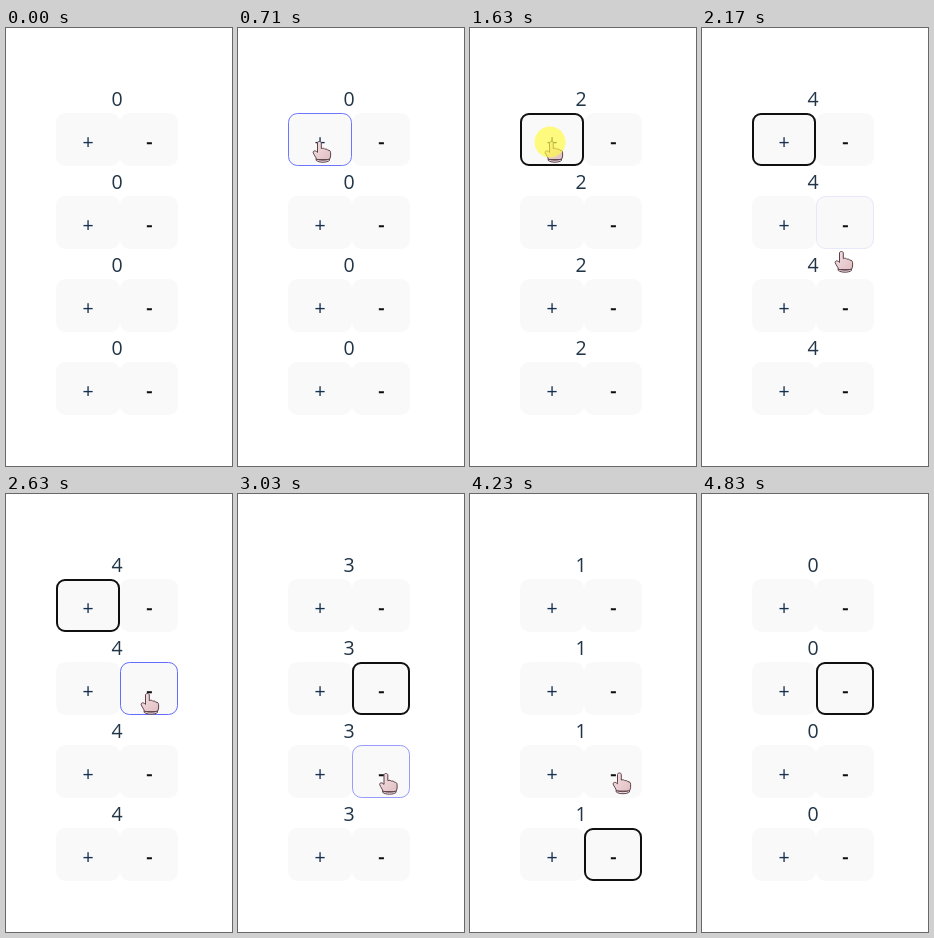
Recreate the animation shown at these times as an HTML page. Size 226 by 438 pixels, loop 5430 ms.

```html
<!DOCTYPE html>
<html lang="en">
<head>
<meta charset="utf-8">
<title>Counters</title>
<style>
  html, body { margin: 0; width: 100%; height: 100%; overflow: hidden; background: #fff; }
  svg { display: block; width: 226px; height: 438px; }
  text { font: 19.5px "Open Sans", "Noto Sans", sans-serif; text-anchor: middle; }
  .count { fill: #213547; }
  .plus { fill: #16304f; }
  .minus { fill: #0c0c0c; stroke: #0c0c0c; stroke-width: .4px; }
  #spot { fill: #fffa3a; opacity: .65; }
</style>
</head>
<body>
<svg viewBox="0 0 226 438">
  <defs>
    <linearGradient id="skin" x1="0" y1="0" x2="1" y2="1">
      <stop offset="0" stop-color="#f5e2e3"/>
      <stop offset="1" stop-color="#e0bec2"/>
    </linearGradient>
  </defs>
  <g id="rows"></g>
  <rect id="hover" fill="none" stroke="#646cff"/>
  <rect id="ring" fill="none" stroke="#101010" stroke-width="2"/>
  <g id="hand" stroke="#5c4149" stroke-linejoin="round">
    <path fill="url(#skin)" d="M-.5 9V1C-.5-1 3.3-1 3.3 1V6.6C5 6 6.3 6.2 6.8 7.2C8.2 6.8 9.4 7.2 9.8 8.2C11.6 8 12.6 9 12.6 10.8V14C12.6 15.6 11.8 16.4 11.4 17.6H-1.6C-1.8 15-4.2 13-4.8 10.6C-5 8.6-2.6 8-.5 10.4Z"/>
    <path fill="#f1e2e8" d="M-1.8 17C1 18.6 9 18.6 11.5 17V18.4C9 20.8 1 20.8-1.8 18.4Z"/>
  </g>
  <circle id="spot" r="15.5"/>
</svg>
<script>
const LOOP = 5430, ENTER = 450, LEAVE = 4830;
const STEP = 65;      // pointer refresh
const LEAD = 130;     // a button is reached this long before the pointer rests
const PITCH = 83, TOP = 85, HEIGHT = 53;
const SIDES = {
  plus: { x: 50, w: 64, mid: 82, sign: "+", change: 1 },
  minus: { x: 114, w: 58, mid: 143.3, sign: "-", change: -1 }
};
const $ = id => document.getElementById(id);

// each move ends at x, y, on a button if one is named
const moves = [
  { start: 450, end: 650, x: 80, y: 114, side: "plus", row: 0 },
  { start: 2030, end: 2170, x: 138, y: 224 },
  { start: 2170, end: 2300, x: 140, y: 200, side: "minus", row: 1 },
  { start: 2760, end: 3030, x: 146.5, y: 280, side: "minus", row: 2 },
  { start: 3300, end: 3560, x: 153, y: 361, side: "minus", row: 3 },
  { start: 4030, end: 4430, x: 143, y: 198, side: "minus", row: 1 },
  { start: 4560, end: 4690, x: 159, y: 140 },
  { start: 4690, end: 4760, x: 208, y: 199 }
];
const clicks = [780, 1240, 1630, 1970, 2640, 3160, 3760, 4490].map(time => ({
  time, up: time + STEP - 5, on: moves.findLast(m => m.end <= time)
}));

const smooth = p => p * p * (3 - 2 * p);

function pointer(t) {
  let at = { x: 138, y: 122 };
  for (const { start, end, x, y } of moves) {
    if (t < start) break;
    const steps = Math.round((end - start) / STEP);
    const done = Math.floor((t - start) / (end - start) * steps) / steps;
    const p = smooth(Math.min(1, done));
    at = { x: at.x + (x - at.x) * p, y: at.y + (y - at.y) * p };
  }
  return at;
}

function set(el, attrs) {
  for (const key in attrs) el.setAttribute(key, attrs[key]);
}

function add(tag, attrs, text = "") {
  const el = document.createElementNS("http://www.w3.org/2000/svg", tag);
  set(el, attrs);
  el.textContent = text;
  return $("rows").appendChild(el);
}

function box({ side, row }, inset, radius) {
  const { x, w } = SIDES[side];
  return {
    x: x + inset, y: TOP + row * PITCH + inset,
    width: w - 2 * inset, height: HEIGHT - 2 * inset, rx: radius
  };
}

const counts = [0, 1, 2, 3].map(row => {
  const y = TOP + row * PITCH;
  for (const side in SIDES) {
    const { mid, sign } = SIDES[side];
    add("rect", { ...box({ side, row }, 0, 9.5), fill: "#f9f9f9" });
    add("text", { class: side, x: mid, y: y + 35.5 }, sign);
  }
  return add("text", { class: "count", x: 111, y: y - 7 });
});

function show(id, on, attrs) {
  $(id).style.display = on ? "" : "none";
  if (on) set($(id), attrs());
}

function draw(t) {
  const total = clicks.reduce((n, c) => n + (c.up <= t ? SIDES[c.on.side].change : 0), 0);
  counts.forEach(el => { el.textContent = total; });

  const click = clicks.findLast(c => c.time <= t);
  show("ring", click, () => box(click.on, 1, 8));

  const over = moves.findLast(m => m.side && m.end - LEAD <= t);
  show("hover", over && over !== click?.on, () => ({
    ...box(over, .5, 9),
    opacity: Math.min(1, .12 + .27 * Math.floor((t - over.end + LEAD) / 63))
  }));

  const { x, y } = pointer(t);
  show("hand", t >= ENTER && t < LEAVE, () => ({ transform: `translate(${x} ${y})` }));
  show("spot", click && t < click.up, () => ({ cx: x, cy: y }));
}

const began = performance.now();
function frame() {
  draw((performance.now() - began) % LOOP);
  requestAnimationFrame(frame);
}
frame();
</script>
</body>
</html>
```
